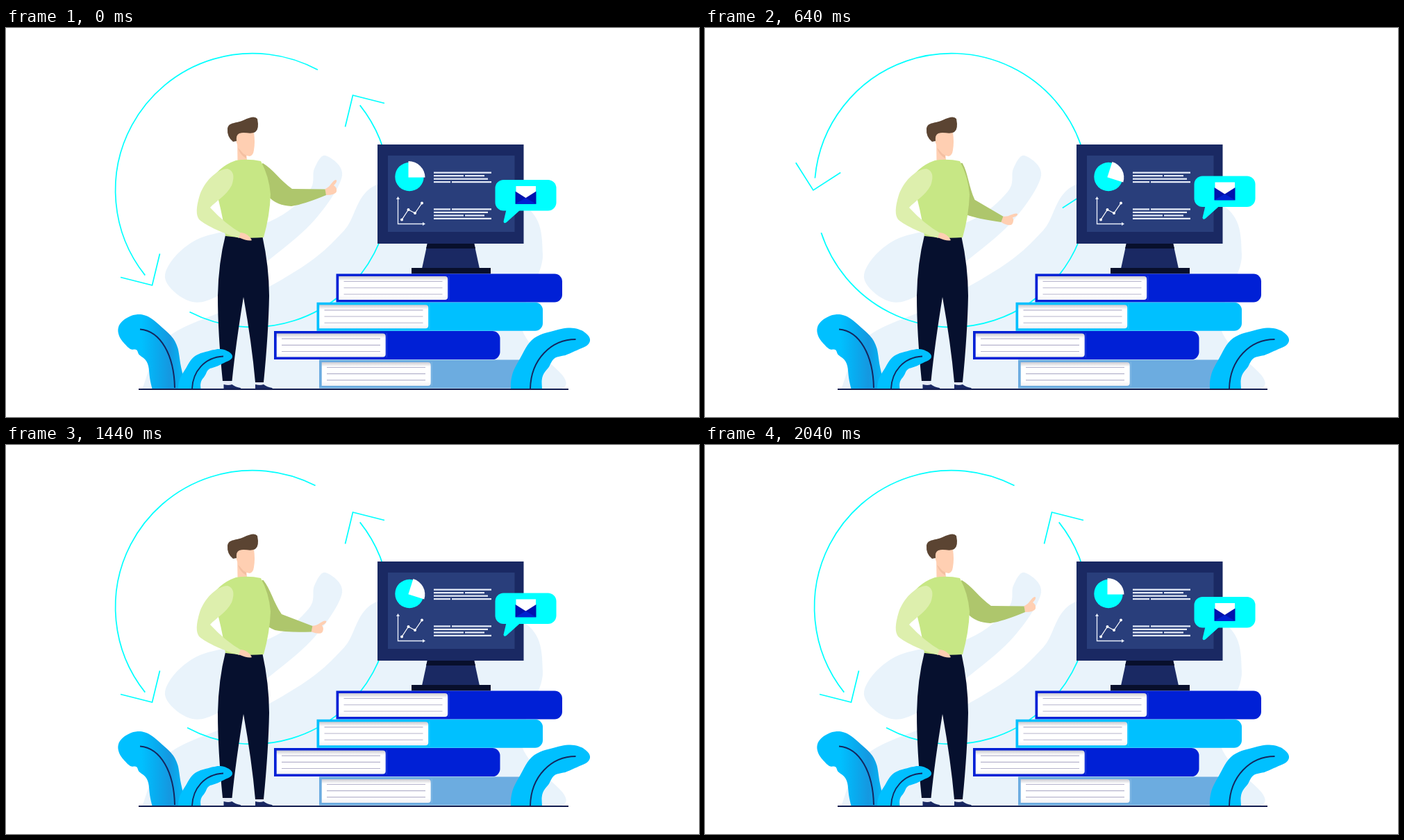
Animation, 998 px wide and 561 px high, one loop 2080 ms. Source, as an HTML page with a canvas:

```html
<!DOCTYPE html>
<html lang="en">
<head>
<meta charset="utf-8">
<title>Learning loop</title>
<style>
html, body { margin: 0; width: 100%; height: 100%; overflow: hidden; background: #fff; }
canvas { display: block; width: 998px; height: 561px; }
</style>
</head>
<body>
<canvas id="stage" width="998" height="561"></canvas>
<script>
const ctx = document.getElementById('stage').getContext('2d');
const LOOP = 2080, STEP = 40, RAD = Math.PI / 180;
const CYAN = '#00ffff', NAVY = '#1a2963', INK = '#06102e', BLUE = '#0020d6', VEIN = '#14265e';
const SKY = '#00c0ff', PALE = '#e9f3fb', SKIN = '#ffcfb2', WHITE = '#fff', CHALK = '#e6ecf8';

const mix = (a, b, u) => a + (b - a) * u;
const ease = u => (1 - Math.cos(Math.PI * Math.max(0, Math.min(1, u)))) / 2;

// Smooth curve through points; an open one is closed by a straight line when filled.
function spline(pts, closed) {
  const path = new Path2D(), n = pts.length;
  const at = i => pts[closed ? (i + n) % n : Math.max(0, Math.min(n - 1, i))];
  path.moveTo(...pts[0]);
  for (let i = 0; i < (closed ? n : n - 1); i++) {
    const [a, b, c, d] = [at(i - 1), at(i), at(i + 1), at(i + 2)];
    path.bezierCurveTo(b[0] + (c[0] - a[0]) / 6, b[1] + (c[1] - a[1]) / 6,
      c[0] - (d[0] - b[0]) / 6, c[1] - (d[1] - b[1]) / 6, ...c);
  }
  return path;
}

function fill(shape, color) {
  ctx.fillStyle = color;
  ctx.fill(typeof shape === 'string' ? new Path2D(shape) : shape);
}

function line(shape, color, width) {
  ctx.strokeStyle = color;
  ctx.lineWidth = width;
  ctx.stroke(new Path2D(shape));
}

function box(x, y, w, h, color, radius = 0) {
  ctx.beginPath();
  ctx.roundRect(x, y, w, h, radius);
  ctx.fillStyle = color;
  ctx.fill();
}

function dot(x, y, r, color) {
  ctx.beginPath();
  ctx.arc(x, y, r, 0, 2 * Math.PI);
  ctx.fillStyle = color;
  ctx.fill();
}

function turned(x, y, angle, draw) {
  ctx.save();
  ctx.translate(x, y);
  ctx.rotate(angle * RAD);
  ctx.translate(-x, -y);
  draw();
  ctx.restore();
}

function shade(x0, y0, x1, y1, ...stops) {
  const g = ctx.createLinearGradient(x0, y0, x1, y1);
  stops.forEach((c, i) => g.addColorStop(i / (stops.length - 1), c));
  return g;
}

function backdrop() {
  fill(spline([[196, 521], [232, 447], [330, 400], [432, 341], [487, 292], [545, 223],
    [735, 250], [773, 327], [742, 430], [803, 503], [800, 521]]), PALE);
  fill(spline([[460, 184], [484, 213], [446, 275], [383, 331], [306, 386], [262, 393],
    [229, 356], [275, 305], [380, 279], [436, 236], [444, 203]], true), PALE);
}

// A bent axis with a wavy outline and a round tip.
function leaf(base, bend, tip, wide, narrow, color) {
  const sides = [[], []], n = 24;
  const on = (i, u) => (1 - u) ** 2 * base[i] + 2 * u * (1 - u) * bend[i] + u * u * tip[i];
  const slope = (i, u) => mix(bend[i] - base[i], tip[i] - bend[i], u);
  for (let k = 0; k <= n; k++) {
    const u = Math.sin(k / n * Math.PI / 2);
    const dx = slope(0, u), dy = slope(1, u), len = Math.hypot(dx, dy);
    const w = mix(wide, narrow, u) * Math.sqrt(1 - u ** 8);
    [-1, 1].forEach((side, j) => {
      const r = side * w * (1 + .07 * Math.sin(16 * u + 2 * j));
      sides[j].push([on(0, u) - dy / len * r, on(1, u) + dx / len * r]);
    });
  }
  ctx.save();
  ctx.beginPath();
  ctx.rect(0, 0, 998, 521);
  ctx.clip();
  fill(spline([...sides[0], ...sides[1].reverse()]), color);
  ctx.restore();
}

function plants() {
  leaf([235, 524], [226, 424], [162, 441], 23, 28, shade(195, 0, 256, 0, SKY, '#08acf0', '#1598e0', '#00b8f8'));
  line('M193 434.5C223 437 242 472 243 519', VEIN, 2);
  leaf([264, 524], [268, 470], [326, 474], 16, 11.5, SKY);
  line('M313 473.5C285 475 269 496 268 520', VEIN, 1.8);
  leaf([749, 524], [754, 441], [841, 451], 22, 19, SKY);
  line('M820.5 449C785 449 756 478 755 520', VEIN, 1.9);
}

function arrows(angle) {
  const x = 355, y = 234;
  ctx.strokeStyle = CYAN;
  ctx.lineWidth = 1.7;
  [[0, 155.7], [180, 156.8]].forEach(([flip, sweep]) => turned(x, y, -angle - flip, () => {
    ctx.beginPath();
    ctx.arc(x, y, 197.4, (sweep - 38.4) * RAD, -38.4 * RAD, true);
    ctx.stroke();
    line('M545 108.5L499.5 97L488.5 142.5', CYAN, 1.7);
  }));
}

// Steady turn that brakes evenly to a stop after half a circle.
function spin(t) {
  const speed = .214, stop = 1088, brake = 2 * 180 / speed - stop;
  if (t < brake) return speed * t;
  return 180 - speed * Math.max(0, stop - t) ** 2 / (2 * (stop - brake));
}

function book(x, y, color, width) {
  box(x, y, width, 41, color, [0, 11, 11, 0]);
  box(x + 161.5, y + 3, 1.5, 35, 'rgba(255,255,255,.12)');
  box(x + 3.7, y + 3.5, 157, 34, shade(0, y + 3, 0, y + 38, '#c6c6ce', WHITE, WHITE, WHITE, WHITE, '#efeff3'), [0, 4, 4, 0]);
  for (let i = 0; i < 3; i++) box(x + 11, y + 10.5 + 9.2 * i, 142, 1.1, '#b5b3cc');
}

function books() {
  const stack = [[475.5, BLUE], [447.5, SKY], [386, BLUE], [451, '#6cace0']];
  stack.forEach(([x, color], i) => book(x, 354.5 + 41.3 * i, color, Math.min(325.5, 770 - x + 31.5 * (i < 3) * 2)));
}

function bars(y, rows) {
  rows.forEach((row, i) => {
    let x = 616;
    for (const end of row) {
      box(x, y + 4.5 * i, end - x, 2.2, CHALK);
      x = end + 2;
    }
  });
}

function monitor(pie) {
  fill('M607 310H674L682 347H599Z', NAVY);
  fill('M607 310H674L676 318H605Z', '#080f2c');
  box(584, 346, 114, 8.5, '#080f2c');
  box(535, 168, 210.5, 143, NAVY);
  box(550, 184, 182.5, 110, '#293e7b');

  dot(581, 214.5, 20.7, CYAN);
  turned(580, 215, pie, () => fill('M579.5 215.5V192A24 23.5 0 0 1 603.5 215.5Z', WHITE));

  const rows = [[699], [659, 689], [694], [640, 699]];
  bars(207.5, rows);
  bars(260.3, rows.reverse());

  line('M564.5 246V282.5H601', CHALK, 1.4);
  fill('M562 247L564.5 243L567 247ZM600 280L604 282.5L600 285Z', CHALK);
  const pts = [[570, 276.5], [579.5, 262], [589, 267], [599, 252.5]];
  line('M' + pts.join('L'), WHITE, 1.3);
  pts.forEach(([x, y]) => dot(x, y, 2, WHITE));
}

function bubble(dy) {
  ctx.save();
  ctx.translate(0, dy);
  box(704.5, 219, 88, 44.5, CYAN, 12);
  fill('M721 260L716.5 279Q717 283 721 280L741 262Z', CYAN);
  box(734.5, 228, 28.5, 18, WHITE);
  fill('M733.5 235.5L748.5 245L763.5 235.5V253.8H733.5Z', '#0012ad');
  fill('M733.5 253.8L748.5 245L763.5 253.8Z', '#0020d0');
  ctx.restore();
}

function frontArm(angle) {
  turned(371, 196, angle, () => {
    fill('M459 232.5Q465 230 468 225Q474 217 476 219.5Q477 222 472 227Q477 230 476 236Q474 241 461 241Z', SKIN);
    fill('M364 199L370 195C384 203 395 220 412 232L459.5 232.5L461 241Q430 254 411 257Q390 256 379 244Z', '#aec66c');
  });
}

function leg(foot) {
  box(foot, 507, 11.5, 8, '#e3e8f3');
  fill(`M${foot} 521V514Q${foot + 7} 516 ${foot + 12} 514Q${foot + 17} 518 ${foot + 24} 519L${foot + 26} 521Z`, NAVY);
}

function man(angle) {
  leg(313.5);
  leg(359);
  fill('M316 299H369Q379 345 379 386Q378 440 371 511H359Q354 455 342 388Q331 455 325.5 509H312Q305 440 305 386Q306 338 316 299Z', INK);
  frontArm(angle);

  fill('M333 158L333.5 192Q340 196 347 191L346 180Z', SKIN);
  fill('M334 173L346 183V188Q337 183 334 173Z', '#f4bfa1');
  fill('M331 153Q343 145 357 151Q359 164 357 176Q356 184 351 185Q340 184 334 170Q330 163 331 153Z', SKIN);
  fill('M327 164Q318 157 319 145C321 135 332 138 342 133Q358 125 362 131Q365 146 359 150C351 154 344 149 336 152Q331 154 332 163Z', '#5b4432');

  fill('M331 191Q349 188 367 192Q379 214 381 240Q380 270 371 302Q343 304 316 300Q313 276 306 248L292 225Q305 200 331 191Z', '#c7e785');
  fill('M319 203Q332 207 325 227C318 241 302 250 294 259Q316 283 339 296L336 303C315 297 289 286 278 276Q271 267 279 241C286 221 303 204 319 203Z', '#ddefad');
  fill('M338 295Q349 296 354 306Q349 308 335 302Z', SKIN);
}

function render(t) {
  const sway = (1 - Math.cos(2 * Math.PI * t / LOOP)) / 2;
  const drop = ease(t / 520) - ease((t - 1240) / 520);

  ctx.fillStyle = WHITE;
  ctx.fillRect(0, 0, 998, 561);
  backdrop();
  arrows(spin(t));
  monitor(26 * sway);
  books();
  bubble(-8.2 * sway);
  man(30 * drop);
  plants();
  box(191, 520, 619, 2, '#111b4d');
}

function tick() {
  const t = performance.now() % LOOP;
  render(Math.floor(t / STEP) * STEP);
  requestAnimationFrame(tick);
}
tick();
</script>
</body>
</html>
```
